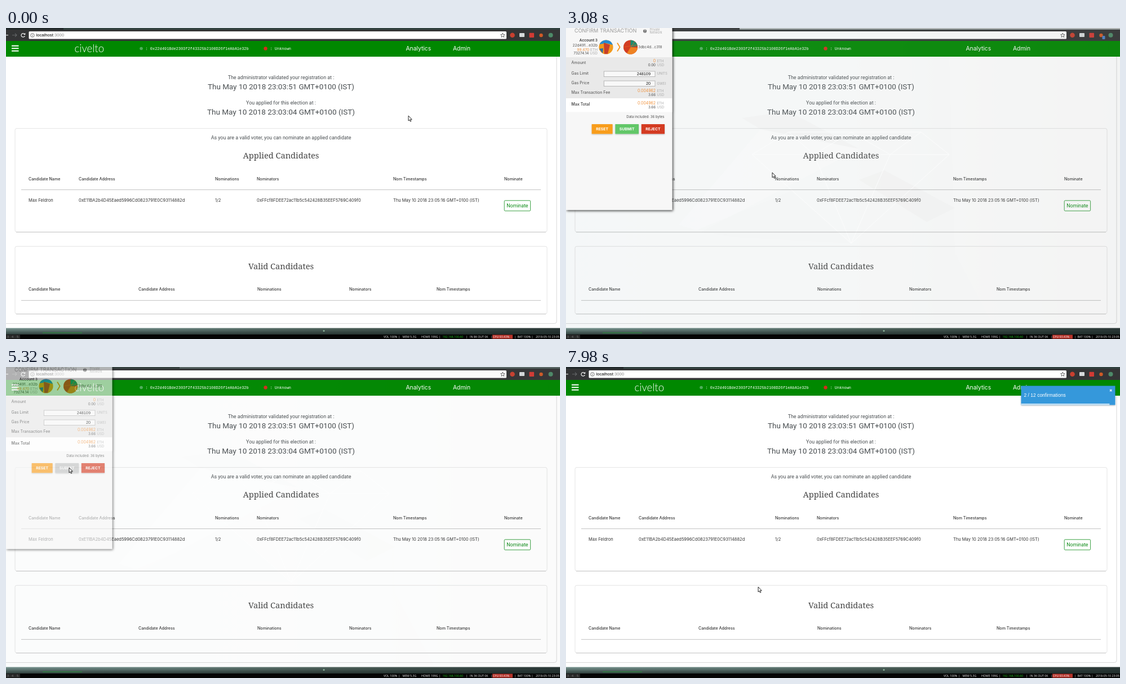
Write an HTML page that moves like this. It is 983 px wide and 553 px high and loops after 8 s.

```html
<!DOCTYPE html>
<html lang="en">
<head>
<meta charset="utf-8">
<title>Election</title>
<style>
html, body { margin: 0; width: 100%; height: 100%; overflow: hidden; background: #000 }
svg { display: block; width: 100%; height: 100% }
text { white-space: pre }
.exo { font-family: Roboto, sans-serif; fill: #484d50 }
.round { font-family: Inter, sans-serif; fill: #333 }
.head { font-weight: 500; font-size: 7.1px }
.serif { font-family: "Noto Serif", serif; font-size: 14.6px; fill: #444 }
.mono { font-family: "Liberation Mono", monospace; font-size: 6.95px; fill: #fff }
.arial { font-family: "Liberation Sans", sans-serif }
.bar { font-family: "Open Sans", sans-serif; font-size: 5.2px; fill: #eee }
</style>
</head>
<body>
<svg viewBox="0 0 983 553">
  <defs>
    <linearGradient id="paper">
      <stop offset="0" stop-color="#98b2ba"/><stop offset=".5" stop-color="#a0b0b0"/><stop offset="1" stop-color="#828684"/>
    </linearGradient>
    <linearGradient id="strip">
      <stop offset="0" stop-color="#7d9a95"/><stop offset=".3" stop-color="#6f8a85"/>
      <stop offset=".6" stop-color="#52665f"/><stop offset="1" stop-color="#2d3a39"/>
    </linearGradient>
    <linearGradient id="shade" x2="0" y2="1">
      <stop offset="0" stop-color="#1c2826" stop-opacity="0"/><stop offset="1" stop-color="#1c2826" stop-opacity=".8"/>
    </linearGradient>
    <filter id="soft" x="-20%" y="-20%" width="140%" height="140%"><feDropShadow dx="1.5" dy="1.5" stdDeviation="1.9" flood-opacity=".8"/></filter>
    <filter id="lift" x="-20%" y="-20%" width="140%" height="160%"><feDropShadow dx="0" dy="1" stdDeviation="1" flood-opacity=".3"/></filter>
  </defs>
  <g id="wall"></g>
  <g id="page"></g>
  <g id="status"></g>
  <g id="popup" filter="url(#soft)"></g>
  <g id="toast"></g>
  <g id="cursor">
    <path id="arrow" d="M0 0V9L2 7.2 3.4 10.3 4.9 9.6 3.5 6.6H6.2Z" fill="#fff" stroke="#111" stroke-width=".9"/>
    <path id="hand" d="M1.2 .6C2 0 2.6.5 2.6 1.2V4L6.5 4.7C7.4 5 7.4 6 7 7.2L6.5 9H2.6L.2 6.2C-.3 5.5.4 5 1.2 5.5Z" fill="#fff" stroke="#111" stroke-width=".8"/>
  </g>
</svg>
<script>
const $ = id => document.getElementById(id);
const text = (x, y, s, cls, attrs = '') => `<text x="${x}" y="${y}" class="${cls}" ${attrs}>${s}</text>`;
const rect = (x, y, w, h, fill, attrs = '') => `<rect x="${x}" y="${y}" width="${w}" height="${h}" fill="${fill}" ${attrs}/>`;
const disc = (x, y, r, fill) => `<circle cx="${x}" cy="${y}" r="${r}" fill="${fill}"/>`;
const line = (d, stroke, w = 1) => `<path d="${d}" fill="none" stroke="${stroke}" stroke-width="${w}"/>`;
const shape = (d, fill, o = 1) => `<path d="${d}" fill="${fill}" opacity="${o}"/>`;
const size = n => `font-size="${n}"`;
const paint = (n, color) => `style="font-size:${n}px;fill:${color}"`;
const mid = n => `text-anchor="middle" ${size(n)}`;
const end = (n, color, more = '') => `text-anchor="end" style="font-size:${n}px;fill:${color};${more}"`;

// Desktop behind the browser
$('wall').innerHTML =
  rect(0, 0, 983, 553, 'url(#paper)') +
  shape('M312 160 395 148 520 215 345 180Z', '#5c6c6b', .5) +
  shape('M345 180 520 215 240 362 200 350Z', '#d8e2e2', .3) +
  shape('M230 360 400 290 506 383 300 372Z', '#6d7b7a', .2) +
  shape('M520 270 565 253 690 320 640 345Z', '#5d605c', .5) +
  shape('M680 52H983V533H760L690 400Z', '#c8c4c0', .16) +
  line('M330 225 395 185H630L680 225 506 383ZM330 225H680M395 185 440 225 506 383 575 225 630 185M440 225 506 185 575 225', '#dfe6e6', 1) +
  rect(0, 533, 983, 12, 'url(#strip)') + rect(0, 533, 983, 12, 'url(#shade)') +
  line('M65 542H135', '#2f7c3f', 1.5) + disc(564, 538.5, 1.5, '#8db59a');

// Browser window
const card = (y, h) => rect(16, y, 944, h, '#fff', 'rx="3" stroke="#dedede" stroke-width=".8"') +
  line(`M18 ${y + h + .4}H958`, '#c4c4c4', .9);
const row = (y, xs, names) => names.map((s, i) => text(xs[i], y, s, 'round head')).join('');
const columns = ['Candidate Name', 'Candidate Address', 'Nominations', 'Nominators', 'Nom Timestamps', 'Nominate'];
const cells = [40, 129, 371, 445, 687, 884];
const voter = ['Max Feldron', '0xE11BA2b4D45Eaed5996Cd0823791E0C93114882d', '1/2',
  '0xFFcf8FDEE72ac11b5c542428B35EEF5769C409f0', 'Thu May 10 2018 23:05:16 GMT+0100 (IST)'];

$('page').innerHTML =
  rect(0, 3, 983, 20, '#343536') + rect(0, 0, 983, 3, '#31413f') + rect(0, 0, 102, 3, '#20282a') +
  `<g id="idle">${rect(0, 0, 308, 3, '#343536') + rect(308, 0, 675, 2.6, '#b4b8b9')}</g>` +
  rect(40.5, 6, 847.5, 13.5, '#fff', 'rx="1.5"') +
  line('M0 12.7H4', '#ddd', 1.2) + line('M11 12.7H19M16 9.7 19 12.7 16 15.7', '#66686a', 1.1) +
  line('M33.2 11.3A3.3 3.3 0 1 0 33.4 14', '#eee', 1.2) + shape('M34.3 8.7V12H31Z', '#eee') +
  line('M43.6 13a3.3 3.3 0 1 0 6.6 0a3.3 3.3 0 1 0-6.6 0M46.9 12.4V15M46.9 10.8V11.6', '#555', .8) +
  text(53.5, 15.4, 'localhost<tspan fill="#888">:3000</tspan>', 'arial', size(7.7)) +
  line('M881.3 9 882.4 11.6 885 11.8 883 13.6 883.7 16.3 881.3 14.8 878.9 16.3 879.6 13.6 877.6 11.8 880.2 11.6Z', '#444', .8) +
  disc(898.5, 12.8, 4.3, '#c9402f') + rect(911, 9, 9, 7, '#d5d9da', 'rx="1"') +
  rect(928.5, 8.8, 8.5, 8.2, '#d23b34', 'rx="1"') + disc(949.5, 13, 3.2, '#cf5a26') +
  rect(951.5, 14, 5, 6, '#4b80c8', 'id="badge" rx="1"') + disc(966.5, 12.8, 4, '#4d8a68') +

  rect(0, 23, 983, 28, '#008800') + rect(0, 51, 983, 482.5, '#fff') +
  line('M10 31.8H22.5M10 36.3H22.5M10 40.8H22.5', '#fff', 2.1) +
  text(121.5, 43.4, 'civelto', '', 'font-family="Lato, sans-serif" font-weight="300" font-size="18.6" fill="#fff"') +
  disc(240, 36.5, 2.8, '#4fae5b') + disc(460.5, 36.5, 3.2, '#d22d1c') +
  text(247.5, 39, ': 0x22d491Bde2303f2f43325b2108D26f1eAbA1e32b', 'mono') + text(468.5, 39, ': Unknown', 'mono') +
  text(709.5, 40, 'Analytics', 'round', paint(10.3, '#fff')) + text(793, 40, 'Admin', 'round', paint(10.3, '#fff')) +

  line('M977 51V522Q977 525.5 973 525.5H0', '#d4d4d4', .9) +
  text(488, 90.5, 'The administrator validated your registration at :', 'exo', mid(8.9)) +
  text(488, 108.6, 'Thu May 10 2018 23:03:51 GMT+0100 (IST)', 'exo', mid(13.4)) +
  text(488, 135.8, 'You applied for this election at :', 'exo', mid(8.9)) +
  text(488, 153.9, 'Thu May 10 2018 23:03:04 GMT+0100 (IST)', 'exo', mid(13.5)) +
  card(178.6, 184) + card(388.3, 120) +
  text(488, 198.3, 'As you are a valid voter, you can nominate an applied candidate', 'exo', mid(8.9)) +
  text(488, 232, 'Applied Candidates', 'serif', 'text-anchor="middle"') +
  text(488, 429, 'Valid Candidates', 'serif', 'text-anchor="middle"') +
  row(270.6, cells, columns) + row(467.4, [40, 235, 446, 609, 764], columns.slice(0, 5)) +
  line('M27 287.6H949M27 484.4H949', '#bcbcbc', .9) +
  voter.map((s, i) => text(cells[i], 309.3, s, 'round', size(7.5))).join('') +
  rect(884.2, 306.8, 46.4, 18.4, '#fff', 'id="button" rx="1.5" stroke="#0a8a14" stroke-width=".8"') +
  text(907.3, 319, 'Nominate', 'exo', 'id="label" text-anchor="middle" style="font-size:8.8px"');

$('status').innerHTML = rect(0, 545, 983, 8, '#050505') + rect(0, 545.5, 25, 7, '#2a2a2a') + rect(863, 545.5, 36, 7, '#b8342a') +
  [[2, '3'], [10, '4'], [19, '5']].map(([x, s]) => text(x, 550.6, s, 'bar', 'style="fill:#888"')).join('') +
  [[670, 'VOL 100% |'], [703.5, 'MEM 5.3G'], [737, 'HOME 199G |'], [816, '|'], [860, '|'], [864, 'CPU 93.43%'],
    [902, '|'], [907.5, 'BAT 100% |'], [940, '2018-05-10 23:05']].map(([x, s]) => text(x, 550.6, s, 'bar')).join('') +
  text(774.5, 550.6, '192.168.100.60', 'bar', 'style="fill:#1fc41f"') + text(823, 550.6, '', 'bar', 'id="net"');

// Wallet window
const soft = '#aaa', orange = '#f0913a', ink = '#4d4d4d';
const unit = (y, s) => text(161.5, y, s, 'round', paint(6, soft));
const sums = (y, eth, usd) => text(159, y, eth, 'round', end(6.9, orange)) + unit(y, 'ETH') +
  text(159, y + 7, usd, 'round', end(6.2, ink)) + unit(y + 7, 'USD');
const label = (y, s, more = '') => text(9.5, y, s, 'round', `style="font-size:7px;fill:${ink};${more}"`);
const field = (y, s) => rect(67.3, y, 90.7, 9.6, '#f8f8f8', 'stroke="#aaa" stroke-width=".8"') +
  text(150, y + 7.4, s, 'arial', end(7.3, '#111'));
const press = (x, w, s, fill, id) => rect(x, 171, w, 17.2, fill, `id="${id}" filter="url(#lift)"`) +
  text(x + w / 2, 182, s, 'round', 'text-anchor="middle" style="font-size:6.8px;font-weight:700;fill:#fff"');
const account = (y, s, color = ink, more = '') => text(56, y, s, 'round', end(6.5, color, more));

$('popup').innerHTML = rect(0, 0, 188.3, 323.5, '#f7f7f7') + '<g id="form">' +
  text(15, 8.2, 'CONFIRM TRANSACTION', 'round', paint(9.1, '#999')) +
  disc(140, 5.5, 3.1, '#777') + text(138.6, 7.6, '?', 'round', paint(5.5, '#fff')) +
  text(148.5, 5, 'Private', 'round', paint(5.5, soft)) + text(148.5, 10, 'Network', 'round', paint(5.5, soft)) +
  account(24.3, 'Account 3', '#333', 'font-weight:600') + account(33, '22d491...e32b') +
  account(40.5, `<tspan fill="${orange}">99.470</tspan> ETH`, soft) +
  account(47.3, `73274.14 <tspan fill="${soft}">USD</tspan>`) +
  disc(71, 34, 12.6, '#f29a1e') + shape('M59.5 29A12.6 12.6 0 0 1 83 30L71 27Z', '#278bd0') +
  shape('M67 26 78 30 74 46 68 46Z', '#c8402a') + shape('M59 37 66 36 65 45Z', '#2c6fa8') +
  disc(114.5, 34, 12.6, '#d23c24') + shape('M114.5 34V21.4A12.6 12.6 0 0 1 127 32Z', '#1e8c70') +
  shape('M114.5 34 127 35A12.6 12.6 0 0 1 108 45Z', '#ee8222') + line('M102 34 126 30M108 45 122 24', '#e3651e', .8) +
  line('M91 26.5 95.6 34 91 41.5', '#f7941d', 1.8) + text(128, 36.4, '3dbc4d...c318', 'round', paint(6.3, ink)) +
  rect(0, 52, 188.3, 73, '#e9e9e9') + rect(0, 125, 188.3, 24.5, '#fff') +
  label(63.6, 'Amount') + sums(61, '0', '0.00') +
  label(82.6, 'Gas Limit') + field(77, '248109') + unit(83.4, 'UNITS') +
  label(100, 'Gas Price') + field(94, '20') + unit(100.6, 'GWEI') +
  label(117, 'Max Transaction Fee') + sums(114.3, '0.004962', '3.66') +
  label(138.4, 'Max Total', 'font-weight:600') + sums(136, '0.004962', '3.66') +
  text(174.5, 160, 'Data included: 36 bytes', 'round', end(6, ink)) +
  press(45.7, 36.9, 'RESET', '#f89d1c', 'reset') + press(87.4, 41.6, 'SUBMIT', '#62c768', 'submit') +
  press(133.8, 41.2, 'REJECT', '#d43a22', 'reject') + '</g>';

$('toast').innerHTML = rect(807.5, 33.5, 167, 34, '#3498db', 'filter="url(#lift)"') +
  rect(807.5, 65, 167, 2.5, '#fff', 'id="progress" opacity=".7"') +
  text(812.5, 53.2, '', 'arial', 'id="note" font-size="8.5" fill="#fff"') +
  text(964, 44, '✖', '', 'font-family="DejaVu Sans, sans-serif" font-size="6.5" fill="#e8f3fb"');

// Motion
const ramp = (t, a, b) => Math.min(1, Math.max(0, (t - a) / (b - a)));
const smooth = k => k * k * (3 - 2 * k);
const show = (id, on) => $(id).setAttribute('display', on ? 'inline' : 'none');
const set = (id, name, value) => $(id).setAttribute(name, value);

// Start, end, target x, y and the sideways bend of each pointer move
const moves = [[250, 1250, 898, 312, 0], [2540, 2760, 366, 257, -362], [3200, 3650, 112, 179, 0], [5400, 5800, 341, 391, 0]];
function pointer(t) {
  let x = 714, y = 156;
  for (const [a, b, tx, ty, bend] of moves) {
    const k = smooth(ramp(t, a, b));
    x += (tx - x) * k;
    y += (ty - y) * k + 2 * k * (1 - k) * bend;
  }
  return [x, y];
}

// Slide in from the right, swinging around the resting place
const bounce = [[0, 1536], [.6, -12.8], [.75, 5.1], [.9, -2.6], [1, 0]];
function slide(k) {
  const i = Math.max(1, bounce.findIndex(p => k <= p[0]));
  const [a, from] = bounce[i - 1], [b, to] = bounce[i];
  return to + (from - to) * (1 - ramp(k, a, b)) ** 3;
}

const enter = 6515, update = 7680;
function draw(t) {
  const [x, y] = pointer(t);
  const hover = x > 884 && x < 931 && y > 306 && y < 326;
  set('cursor', 'transform', `translate(${x} ${y})`);
  show('arrow', !hover);
  show('hand', hover);
  set('button', 'fill', hover ? '#0a8a14' : '#fff');
  $('label').style.fill = hover ? '#fff' : '#0a8a14';

  const away = ramp(t, 1800, 1960) - ramp(t, 5230, 5360);
  set('page', 'opacity', 1 - .1 * away);
  set('idle', 'opacity', away);
  const fade = ramp(t, 1890, 2220) - ramp(t, 5230, 5480);
  set('popup', 'opacity', fade);
  show('popup', fade > 0);
  show('form', t >= 2920);
  show('badge', t >= 1860 && t < 5000);
  set('submit', 'fill', t < 4900 ? '#62c768' : '#c2c2c2');
  $('net').textContent = t < 2920 ? 'IN 8K OUT 0K' : 'IN 3K OUT 0K';

  const k = ramp(t, enter, enter + 700);
  show('toast', t >= enter);
  set('toast', 'transform', `translate(${slide(k)} 0)`);
  set('toast', 'opacity', ramp(k, 0, .6));
  $('note').textContent = t < update ? 'TRANSACTION SUBMITTED' : '2 / 12 confirmations';
  set('progress', 'width', 167 * (1 - ramp(t - (t < update ? enter : update), 0, 5000)));
}

function tick() {
  draw(performance.now() % 8000);
  requestAnimationFrame(tick);
}
tick();
</script>
</body>
</html>
```
